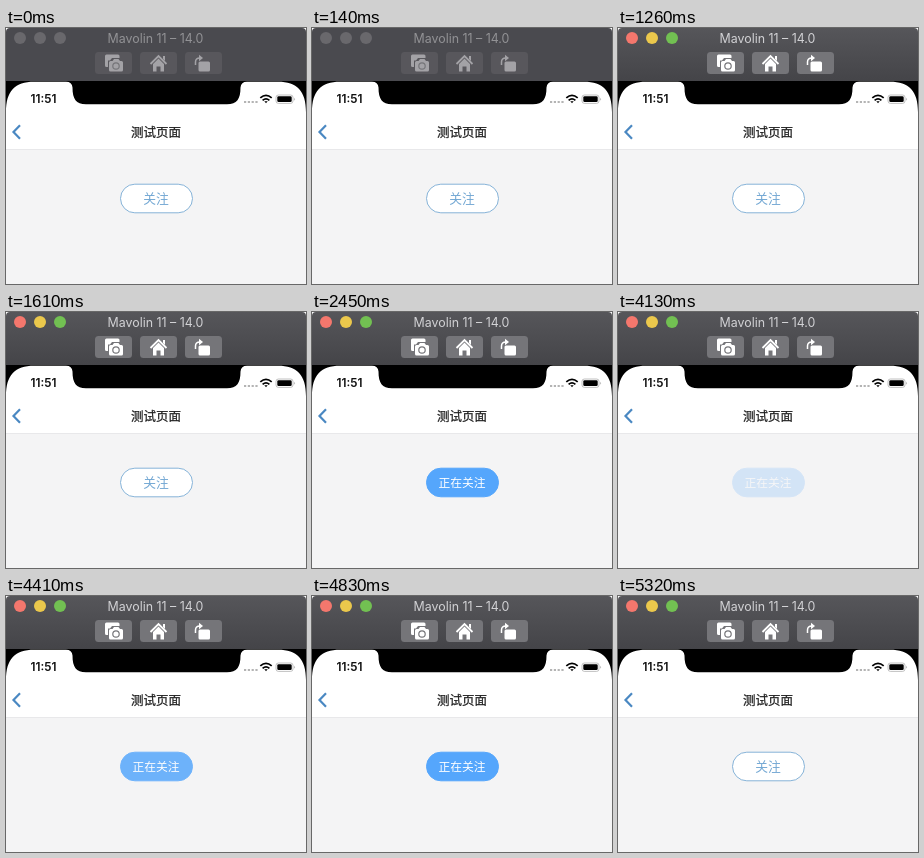
Write an HTML page that moves like this. It is 300 px wide and 256 px high and loops after 6.93 s.

```html
<!DOCTYPE html>
<html lang="zh">
<head>
<meta charset="utf-8">
<style>
  html, body { margin: 0; width: 100%; height: 100%; overflow: hidden; background: #fff; }
  svg { display: block; width: 300px; height: 256px; }
  text { font-family: Inter, "Noto Sans CJK SC", "Noto Sans CJK", sans-serif; text-anchor: middle; }
  .idle #lights circle { fill: #69686c; }
  .idle #bar { fill: #4a4a4f; }
  .idle #title { fill: #929295; }
  .idle .key { fill: #58575c; }
  .idle .icon { color: #a3a2a6; }
  .key { fill: #757579; }
  .icon { color: #fff; }
</style>
</head>
<body>
<svg id="stage" viewBox="0 0 300 256">
  <defs>
    <linearGradient id="metal" x2="0" y2="1">
      <stop stop-color="#56565a"/><stop offset="1" stop-color="#444448"/>
    </linearGradient>
  </defs>

  <!-- window chrome -->
  <path id="bar" fill="url(#metal)" d="M0 54V4Q0 0 4 0H296Q300 0 300 4V54Z"/>
  <g id="lights">
    <circle cx="14" cy="10" r="6" fill="#f4776d"/>
    <circle cx="34" cy="10" r="6" fill="#ebc84c"/>
    <circle cx="54" cy="10" r="6" fill="#72c052"/>
  </g>
  <text id="title" x="149.5" y="14.6" font-size="12.4" fill="#d2d2d5">Mavolin 11 – 14.0</text>
  <g id="tools">
    <rect class="key" x="89" y="24" width="37" height="22" rx="3.5"/>
    <rect class="key" x="134" y="24" width="37" height="22" rx="3.5"/>
    <rect class="key" x="179" y="24" width="37" height="22" rx="3.5"/>
    <g class="icon" fill="currentColor">
      <path d="M99 28Q99 26.500 100.500 26.500H112Q113.500 26.500 113.500 28V30H106L104 32.500H102V39H100.500Q99 39 99 37.500Z"/>
      <path d="M104.500 33H106.500L108 31H112.500L114 33H115.500Q117 33 117 34.500V42Q117 43.500 115.500 43.500H104.500Q103 43.500 103 42V34.500Q103 33 104.500 33Z"/>
      <circle class="lens" cx="110" cy="38" r="3.2" fill="none" stroke="#757579" stroke-width="1.2"/>
      <path d="M144.500 36 152.500 28 160.500 36" fill="none" stroke="currentColor" stroke-width="1.8"/>
      <path d="M157 28H159V33L157 31Z"/>
      <path d="M147 36 152.500 30.500 158 36V43.500H154.500V38.500H150.500V43.500H147Z"/>
      <rect x="192.500" y="33.500" width="11.500" height="10" rx="1.500"/>
      <path d="M189.500 37V34Q189.500 30 194 30" fill="none" stroke="currentColor" stroke-width="1.5"/>
      <path d="M193 26.800 197 30 193 33.200Z"/>
    </g>
  </g>

  <!-- phone screen -->
  <rect y="53" width="300" height="36" fill="#000"/>
  <path fill="#fff" d="M0 122V84C0 63 9 53.800 28 53.800H60Q66 53.800 66.500 59.500C66.500 71 70 76.300 80 76.300H221C231 76.300 234.500 71 234.500 59.500Q235 53.800 241 53.800H272C291 53.800 300 63 300 84V122Z"/>
  <rect y="121" width="300" height="135" fill="#f4f4f5"/>
  <rect y="121" width="300" height="1" fill="#e8e8ea"/>
  <text x="37.500" y="75.200" font-size="11.800" font-weight="600" fill="#111">11:51</text>
  <path d="M238 74H252" stroke="#b4b4b4" stroke-width="1.8" stroke-dasharray="2.2 1.600"/>
  <g fill="none" stroke="#000" stroke-width="1.700">
    <path d="M254.300 69.800Q260 64.800 265.700 69.800M256.600 72.300Q260 69.300 263.400 72.300"/>
    <path d="M258.300 73.300H261.700L260 75.200Z" fill="#000" stroke="none"/>
  </g>
  <rect x="270" y="67" width="17" height="8.400" rx="2.400" fill="none" stroke="#b0b0b0" stroke-width=".8"/>
  <rect x="271.300" y="68.300" width="14.400" height="5.800" rx="1.300"/>
  <path d="M288.300 69.800Q290 71.200 288.300 72.700Z" fill="#999"/>
  <path d="M14 97.300 7.500 104 14 110.700" fill="none" stroke="#4a88c2" stroke-width="2.200"/>
  <text x="150" y="108.500" font-size="12.500" fill="#222" stroke="#222" stroke-width=".25">测试页面</text>

  <g id="button">
    <rect id="pill" x="114.500" y="156.200" width="72" height="28.600" rx="14.300"/>
    <text id="label" x="150" y="174.900"></text>
  </g>
</svg>
<script>
const LOOP = 6930, STEP = 70;
const ACTIVE_AT = 1260, FOLLOW_AT = 2450, UNFOLLOW_AT = 5320;
const presses = [{ down: 1330, up: 1368 }, { down: 4060, up: 4238 }];
const $ = id => document.getElementById(id);

const easeInOut = p => p < .5 ? 2 * p * p : 1 - 2 * (1 - p) ** 2;

// A touch dims the button at once; letting go restores it over 250 ms.
function opacityAt(t) {
  const press = presses.findLast(p => t >= p.down);
  if (!press) return 1;
  const progress = Math.min(1, Math.max(0, (t - press.up) / 250));
  return .2 + .8 * easeInOut(progress);
}

function setAttributes(node, values) {
  for (const [name, value] of Object.entries(values)) node.setAttribute(name, value);
}

function draw(now) {
  const t = Math.floor((now % LOOP) / STEP) * STEP;
  const following = t >= FOLLOW_AT && t < UNFOLLOW_AT;
  $('stage').classList.toggle('idle', t < ACTIVE_AT);
  setAttributes($('button'), { opacity: opacityAt(t) });
  setAttributes($('pill'), {
    fill: following ? '#55a6fc' : '#fff',
    stroke: following ? '#55a6fc' : '#86b3d8'
  });
  setAttributes($('label'), {
    'font-size': following ? 11.8 : 12.8,
    fill: following ? '#fff' : '#72a7d3'
  });
  $('label').textContent = following ? '正在关注' : '关注';
}

let start;
function frame(now) {
  start ??= now;
  draw(now - start);
  requestAnimationFrame(frame);
}
draw(0);
requestAnimationFrame(frame);
</script>
</body>
</html>
```
